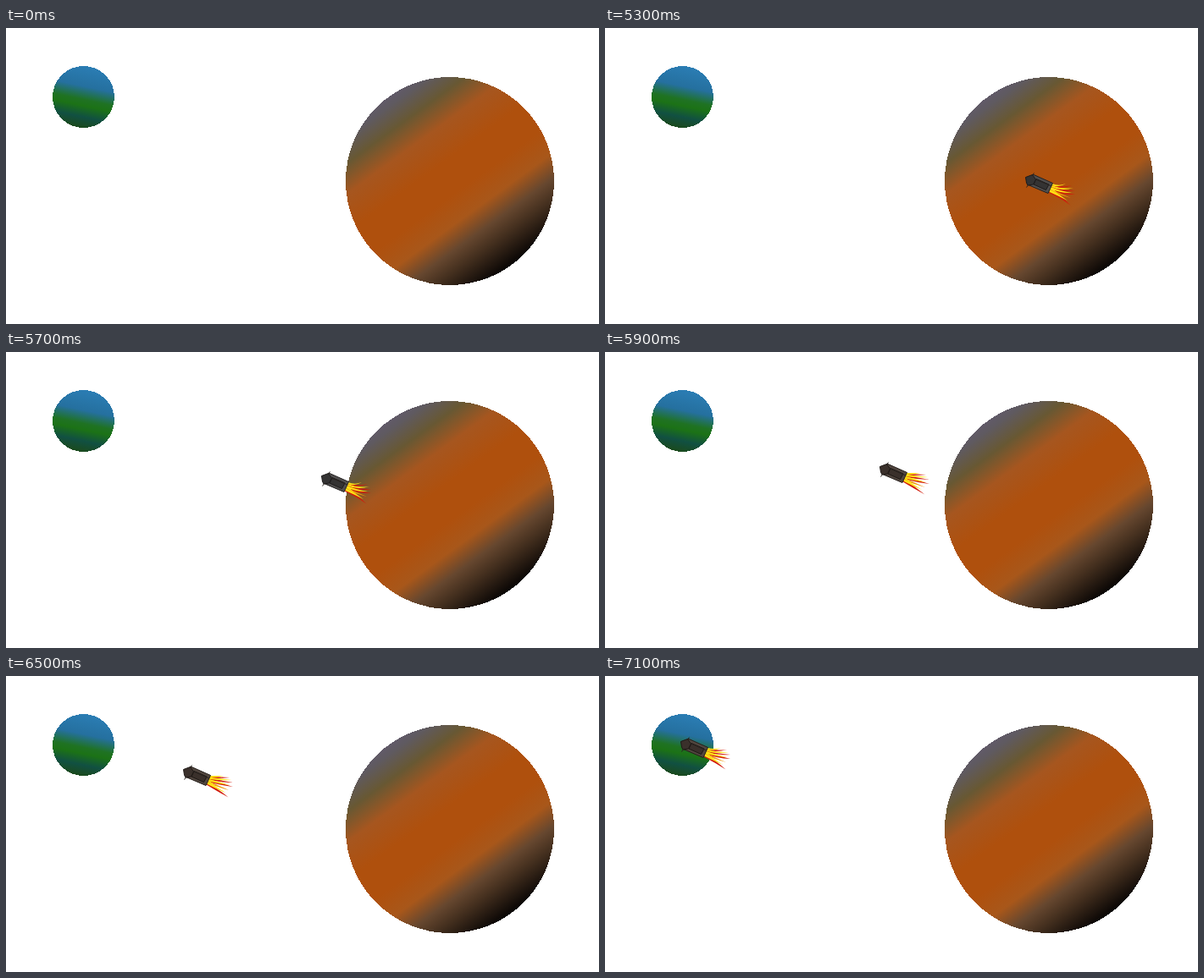
These frames come from a looping animation (700x350 px, 7.2 s). An HTML page:

```html
<!DOCTYPE html>
<html lang="en">
<head>
<meta charset="utf-8">
<title>Rocket between planets</title>
<style>
  html, body { margin: 0; width: 100%; height: 100%; overflow: hidden; background: #fff; }
  svg { display: block; }
  .planet { shape-rendering: crispEdges; }
  .hull { fill: #504e4e; stroke: #242222; }
  .nose, .panel { fill: #343333; stroke: #1d1b1b; }
  .warm .hull { fill: #51463f; stroke: #261f1b; }
  .warm .nose, .warm .panel { fill: #3a302b; stroke: #1e1815; }
  .fin { fill: none; stroke: #29231f; }
</style>
</head>
<body>
<svg width="700" height="350" viewBox="0 0 700 350">
  <defs>
    <linearGradient id="mars" gradientUnits="userSpaceOnUse" x1="451.4" y1="81.4" x2="596.6" y2="280.6">
      <stop offset="0" stop-color="#615a69"/>
      <stop offset=".04" stop-color="#5f5a60"/>
      <stop offset=".14" stop-color="#685833"/>
      <stop offset=".26" stop-color="#a6561f"/>
      <stop offset=".41" stop-color="#af500d"/>
      <stop offset=".56" stop-color="#af500d"/>
      <stop offset=".68" stop-color="#a8571a"/>
      <stop offset=".78" stop-color="#66472f"/>
      <stop offset=".86" stop-color="#45301f"/>
      <stop offset="1" stop-color="#080504"/>
    </linearGradient>
    <linearGradient id="earth" gradientUnits="userSpaceOnUse" x1="99" y1="45.8" x2="84" y2="117.2">
      <stop offset="0" stop-color="#2b7db4"/>
      <stop offset=".33" stop-color="#25709f"/>
      <stop offset=".54" stop-color="#1f7223"/>
      <stop offset=".64" stop-color="#1c7216"/>
      <stop offset=".82" stop-color="#115042"/>
      <stop offset="1" stop-color="#1b4a1c"/>
    </linearGradient>
  </defs>
  <circle class="planet" cx="91.5" cy="81.5" r="36.5" fill="url(#earth)"/>
  <circle class="planet" cx="524" cy="181" r="123" fill="url(#mars)"/>
  <g id="rocket" visibility="hidden">
    <g id="flames"></g>
    <path class="hull" d="M9 2L32.500 12.500 27 24.500 3.500 14.500Z"/>
    <path class="panel" d="M13 7.500L28 14 24.500 20.500 10 14Z"/>
    <path class="nose" d="M.5 5.500L8.500 2.500 12.500 8 9.500 14 3 15 1.500 12Z"/>
    <path class="fin" d="M10.500 .5L7.500 4M1.500 17.500L4 14M12.500 8L31 16"/>
  </g>
</svg>
<script>
  const LOOP = 7200, STEP = 100, LAUNCH = 5000;
  const rocket = document.getElementById('rocket');
  const flames = document.getElementById('flames');

  // time, x, y of the rocket's box
  const route = [
    [5000, 588, 193], [5500, 435, 156], [5700, 372, 141], [5800, 345, 135],
    [5900, 324, 130], [6300, 252, 112], [6500, 209, 105], [6700, 151, 91], [7100, 89, 72]
  ];

  // tip x, tip y, half width, colour
  const red = '#d21c0c', yellow = '#ffe414', orange = '#f09a10';
  const tongues = [
    [55, 15, 1, red], [59, 21, 1.2, red], [59, 26, 1.4, red], [53.500, 38.500, 1.8, red], [40, 30, 1.2, red],
    [48, 13, 1, yellow], [57, 18, 1.1, yellow], [55, 24, 1.3, yellow],
    [54, 30, 1.3, orange], [50, 33, 1.6, yellow], [39, 26, 1, yellow]
  ];

  function tongue([x, y, w, color], bend) {
    const side = Math.min(1, Math.max(0, (y - 13) / 22));
    const bx = 32 - 4 * side, by = 14 + 8 * side;
    const reach = Math.hypot(x - bx, y - by) / 2;
    const mix = (a, b) => a + (b - a) * bend;
    const cx = mix((x + bx) / 2, bx + reach * .91);
    const cy = mix((y + by) / 2, by + reach * .41);
    return `<path fill="${color}" d="M${bx} ${by - w}Q${cx} ${cy - w} ${x} ${y}Q${cx} ${cy + w} ${bx} ${by + w}Z"/>`;
  }

  const burn = bend => tongues.map(t => tongue(t, bend)).join('');
  const looks = [burn(1), burn(.15), burn(.6)];
  let look = -1;

  function place(t) {
    const i = Math.max(1, route.findIndex(p => p[0] >= t));
    const [t0, x0, y0] = route[i - 1], [t1, x1, y1] = route[i];
    const k = (t - t0) / (t1 - t0);
    rocket.setAttribute('transform', `translate(${Math.round(x0 + (x1 - x0) * k)} ${Math.round(y0 + (y1 - y0) * k)})`);
  }

  function draw() {
    const t = Math.floor(performance.now() % LOOP / STEP) * STEP;
    const flying = t >= LAUNCH;
    rocket.setAttribute('visibility', flying ? 'visible' : 'hidden');
    if (flying) {
      place(t);
      const next = t < 5800 ? 0 : t < 6600 ? 1 : 2;
      if (next !== look) {
        look = next;
        flames.innerHTML = looks[look];
        rocket.setAttribute('class', look ? 'warm' : '');
      }
    }
    requestAnimationFrame(draw);
  }
  draw();
</script>
</body>
</html>
```
